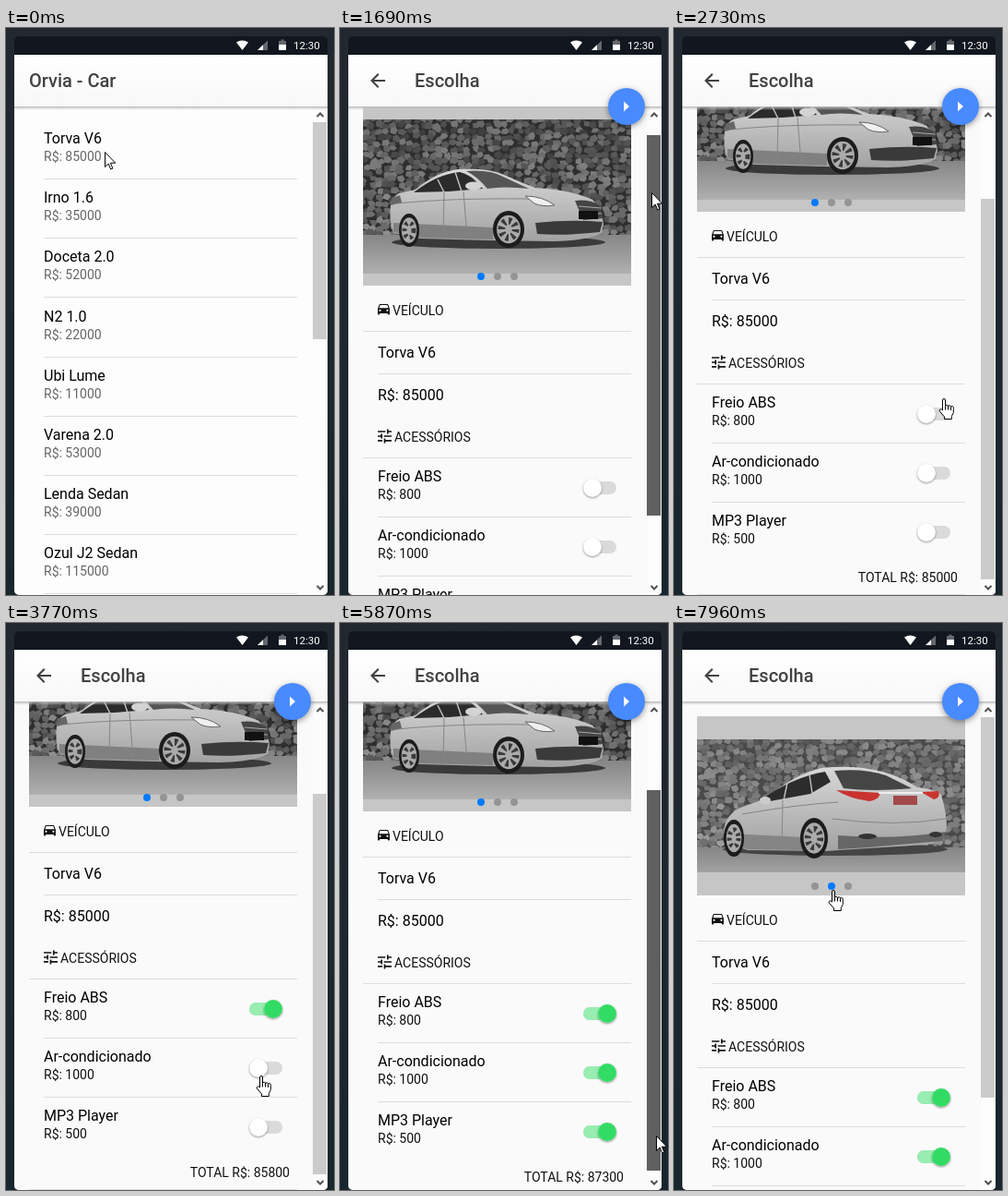
Recreate the animation shown at these times as an HTML page. Size 356x614 px, loop 8000 ms.

```html
<!DOCTYPE html>
<html lang="pt-BR">
<head>
<meta charset="utf-8">
<title>Escolha</title>
<style>
  html, body { margin: 0; width: 100%; height: 100%; overflow: hidden; background: #1d262d; }
  svg { display: block; }
  text { font-family: Roboto, sans-serif; font-size: 14px; fill: #111; white-space: pre; }
  .big { font-size: 16px; fill: #000; }
  .dim { fill: #666; }
  .title { font-size: 20px; font-weight: 500; fill: #424242; }
  .line { fill: #dcdcdc; }
  .knob { filter: drop-shadow(0 1px 1px #0006); }
  .fab { filter: drop-shadow(0 2px 3px #0006); }
</style>
</head>
<body>
<svg id="stage" width="356" height="614" viewBox="0 0 356 614"></svg>
<script>
const STEP = 130, LOOP = 8000, SLIDE = 291;
const cars = [["Torva V6", 85000], ["Irno 1.6", 35000], ["Doceta 2.0", 52000], ["N2 1.0", 22000],
  ["Ubi Lume", 11000], ["Varena 2.0", 53000], ["Lenda Sedan", 39000], ["Ozul J2 Sedan", 115000]];
const extras = [["Freio ABS", 800, 3190], ["Ar-condicionado", 1000, 3970], ["MP3 Player", 500, 4885]];

// Markup helpers
const text = (x, y, s, cls = "") => `<text x="${x}" y="${y}" class="${cls}">${s}</text>`;
const line = (x, y) => `<rect class="line" x="${x}" y="${Math.round(y)}" width="${316 - x}" height="1"/>`;
const path = (d, fill, more = "") => `<path d="${d}" fill="${fill}" ${more}/>`;
const header = (x, s) => `<rect x="9" y="29" width="340" height="56" fill="url(#bar)"/>
  <rect x="9" y="85" width="340" height="4" fill="url(#shade)"/>` + text(x, 64, s, "title");
const scrollbar = (id, height) => `<rect x="333" y="85" width="16" height="529" fill="#fcfcfc"/>
  ${path("M337.5 96l3.5-3.5 3.5 3.5M337.5 604l3.5 3.5 3.5-3.5", "none", 'stroke="#505050" stroke-width="2"')}
  <rect id="${id}" x="333" y="102" width="15" height="${height}" fill="#cbcbcb"/>`;

let seed = 41;
const random = () => (seed = seed * 16807 % 2147483647) / 2147483647;

// Rough stones on a jittered grid, darker towards the top
function wall() {
  let out = "";
  for (let y = 113; y < 250; y += 6.5)
    for (let x = 24; x < 320; x += 8) {
      const cx = x + random() * 5, cy = y + random() * 4, tone = 58 + (y - 113) * .2 + random() * 60 | 0;
      const points = [0, 1, 2, 3, 4].map(i => {
        const r = 2.8 + random() * 2.4;
        return (cx + r * 1.2 * Math.cos(i * 1.26)).toFixed(1) + "," + (cy + r * Math.sin(i * 1.26)).toFixed(1);
      });
      out += `<polygon points="${points.join(" ")}" fill="rgb(${tone},${tone},${tone})"/>`;
    }
  return out;
}

const ellipse = (x, y, rx, ry, fill, more = "") =>
  `<ellipse cx="${x}" cy="${y}" rx="${rx}" ry="${ry}" fill="${fill}" ${more}/>`;
const wheel = (x, y, rx, ry) => ellipse(x, y, rx, ry, "#1c1c1c") + ellipse(x, y, rx * .76, ry * .76, "#aaa") +
  ellipse(x, y, rx * .45, ry * .45, "none", `stroke="#3a3a3a" stroke-width="${rx * .45}" stroke-dasharray="3 3.5"`);

const photo = (x, y, h, light, ground, shapes) => `<svg x="${x}" y="${y}" width="${SLIDE}" height="${h}" viewBox="25 ${y} ${SLIDE} ${h}">
  <rect x="25" y="100" width="291" height="190" fill="#2e2e2e"/><use href="#wall"/>
  <rect x="25" y="100" width="291" height="190" fill="#fff" opacity="${light}"/>
  <rect x="25" y="${ground}" width="291" height="42" fill="url(#ground)"/>${shapes}</svg>`;

const frontView = ellipse(172, 248, 116, 7, "#3a3a3a") +
  path("M55 208Q56 199 64 195L82 191Q104 172 128 169Q158 167 178 175Q198 184 212 189Q254 192 274 202Q284 211 286 228L284 238Q270 246 232 247L160 246 88 244 58 238Q53 225 55 208Z", "url(#body)") +
  path("M58 227L166 232 166 245 88 243 58 237Z", "#808080") +
  path("M80 194Q106 174 130 172Q142 174 155 190L118 193Z", "#2b2b2b") +
  path("M137 171Q162 169 177 177L205 190Q178 187 160 190Q148 176 137 171Z", "#555") +
  path("M106 180L113 194M125 172L132 193", "none", 'stroke="#bdbdbd" stroke-width="1.5"') +
  path("M62 206Q120 200 205 201M113 194L112 240M134 193L138 242", "none", 'stroke="#858585"') +
  path("M56 200l9-3 2 8-12 3z", "#666") + ellipse(145, 187, 9, 4.5, "#d4d4d4") +
  path("M201 198Q220 198 233 208Q220 210 211 206Z", "#f0f0f0", 'stroke="#666"') +
  path("M255 203Q270 201 282 208L286 222 264 224Z", "#444") +
  path("M259 209L283 211M261 216L284 217", "none", 'stroke="#aaa"') +
  path("M212 227Q250 223 285 226L282 237Q246 241 214 239Z", "#3a3a3a") +
  '<rect x="259" y="214" width="21" height="9" fill="#111"/>' +
  wheel(75, 235, 11, 18) + wheel(183, 234, 17, 20);

const rearView = ellipse(175, 245, 122, 7, "#444") +
  path("M54 224Q56 208 72 200L100 190Q130 164 160 157Q196 153 226 161Q250 168 264 178Q284 180 290 186Q296 205 296 222Q293 237 275 240L210 244 165 247 80 246 56 238Z", "url(#body)") +
  path("M58 228L140 232 140 246 80 245 58 238Z", "#858585") +
  path("M94 192Q128 167 164 161L170 172 148 185 104 193Z", "#2c2c2c") +
  path("M174 160Q206 157 230 165L258 179Q216 183 184 179Z", "#454545") +
  path("M123 173L119 192M147 164L150 184", "none", 'stroke="#bdbdbd" stroke-width="1.5"') +
  path("M74 207Q130 197 178 194M118 192L117 242M172 212Q240 221 295 212", "none", 'stroke="#858585"') +
  ellipse(99, 192, 6, 4, "#ccc") +
  path("M176 181L224 184Q222 192 212 193 190 190 176 181Z", "#c9342f") +
  path("M268 183L287 182Q290 189 282 191Z", "#c9342f") +
  '<rect x="222" y="183" width="48" height="2" fill="#eee"/><rect x="238" y="187" width="26" height="10" fill="#a24a4a"/>' +
  path("M178 230Q240 235 295 226L291 236 210 243 178 245Z", "#666") +
  ellipse(210, 231, 10, 3, "#333") + ellipse(284, 229, 7, 3, "#333") +
  wheel(65, 233, 11, 20) + wheel(152, 233, 15, 22);

const rowY = i => 64.17 * i;
const listRows = cars.map(([name, price], i) => text(41, Math.round(125 + rowY(i)), name, "big") +
  text(41, Math.round(144 + rowY(i)), "R$: " + price, "dim") + line(41, 163 + rowY(i))).join("");

const extraRows = extras.map(([name, price], i) => `<g transform="translate(0 ${Math.round(rowY(i))})">
  ${text(41, 507, name, "big")}${text(41, 526, "R$: " + price)}${i < 2 ? line(41, 545) : ""}
  <rect x="264" y="507" width="36" height="14" rx="7" fill="#dadada"/>
  <rect id="track${i}" x="264" y="507" width="36" height="14" rx="7" fill="#98edb1"/>
  <g id="knob${i}" class="knob"><circle cx="274" cy="514" r="10" fill="#fff"/>
  <circle id="tint${i}" cx="274" cy="514" r="10" fill="#32db64"/></g></g>`).join("");

const gradient = (id, from, to) => `<linearGradient id="${id}" x2="0" y2="1"><stop stop-color="${from}"/><stop offset="1" stop-color="${to}"/></linearGradient>`;

stage.innerHTML = `<defs>
  ${gradient("desk", "#22282f", "#19262e")}${gradient("bar", "#fff", "#f8f8f8")}
  ${gradient("shade", "#b4b4b4", "#d0d0d000")}${gradient("ground", "#868686", "#b0b0b0")}${gradient("body", "#d8d8d8", "#a2a2a2")}
  <clipPath id="screen"><rect x="9" y="9" width="340" height="605" rx="5"/></clipPath>
  <g id="wall">${wall()}</g></defs>
  <rect width="356" height="614" fill="url(#desk)"/>
  <g clip-path="url(#screen)">
    <rect x="9" y="29" width="340" height="585" fill="#fdfdfd"/>
    <rect id="pressed" x="25" y="100" width="291" height="63" fill="#efefef"/>
    ${listRows}${scrollbar("listThumb", 235)}${header(25, "Orvia - Car")}
    <g id="detail">
      <rect x="9" y="29" width="340" height="600" fill="#fafafa"/>
      <g id="content">
        <svg x="25" y="101" width="291" height="194" viewBox="25 101 291 194">
          <rect x="25" y="101" width="291" height="194" fill="#c6c6c6"/>
          <g id="slides">${photo(25, 115, 167, 0, 240, frontView)}${photo(25 + SLIDE, 126, 144, .13, 243, `<g transform="translate(${0})">${rearView}</g>`)}</g>
          ${[0, 1].map(i => `<circle id="dot${i}" cx="${153 + 18 * i}" cy="285" r="4"/>`).join("")}
          <circle cx="189" cy="285" r="4" fill="#949494"/>
        </svg>
        ${path("M18.9 6C18.7 5.4 18.2 5 17.5 5h-11C5.8 5 5.3 5.4 5.1 6L3 12v8q0 1 1 1h1q1 0 1-1v-1h12v1q0 1 1 1h1q1 0 1-1v-8zM6.5 16a1.5 1.5 0 1 1 0-3 1.5 1.5 0 0 1 0 3zM17.5 16a1.5 1.5 0 1 1 0-3 1.5 1.5 0 0 1 0 3zM5 11l1.5-4.5h11L19 11z", "#111", 'fill-rule="evenodd" transform="translate(38.8 311.4) scale(.72)"')}
        ${text(57, 327, "VEÍCULO")}${line(25, 344)}
        ${text(41, 373, cars[0][0], "big")}${line(41, 390)}${text(41, 419, "R$: 85000", "big")}
        ${path("M3 17v2h6v-2zM3 5v2h10V5zM13 21v-2h8v-2h-8v-2h-2v6zM7 9v2H3v2h4v2h2V9zM21 13v-2H11v2zM15 9h2V7h4V5h-4V3h-2z", "#111", 'transform="translate(38.5 448) scale(.83)"')}
        ${text(59, 464, "ACESSÓRIOS")}${line(25, 481)}
        ${extraRows}
        <text id="total" x="308" y="696" text-anchor="end"></text>${line(25, 709)}
      </g>
      ${scrollbar("thumb", 412)}${header(81, "Escolha")}
      ${path("M49 56H37l5.5-5.6L41 49l-8 8 8 8 1.4-1.4L37 58H49z", "#424242")}
      <circle class="fab" cx="311" cy="85" r="20" fill="#488aff"/>${path("M308 79.5v11l6-5.5z", "#fff")}
    </g>
    <rect x="9" y="9" width="340" height="20" fill="#12171f"/>
    <g fill="#fff">
      <path d="M250 15.5Q256.5 11.5 263 15.5L256.5 24z"/>
      <path d="M284 13.5V24H273z" opacity=".35"/><path d="M279 18.3V24H273z"/>
      <path d="M296 14h2.5v-1.5h3V14h2.5v10h-8z" opacity=".35"/><path d="M296 18h8v6h-8z"/>
    </g>
    <text x="312" y="23" style="font-size:11.5px;fill:#fff">12:30</text>
  </g>
  <g id="arrow" fill="#fff" stroke="#000"><path d="M.5.5V16.5l3.7-3.5 2.5 6 2.2-1-2.5-5.8h5.3z"/></g>
  <g id="hand" fill="#fff" stroke="#000"><g transform="translate(-6)">
    <path d="M4.5 13V2a1.5 1.5 0 0 1 3 0V8.5a1.5 1.5 0 0 1 3 .5 1.5 1.5 0 0 1 3 .7 1.4 1.4 0 0 1 2.8.8V15.5l-2 4V22.5H6.5V20L1.3 14a1.5 1.5 0 0 1 2-2z"/>
    <path d="M7.5 8.5v4M10.5 9v3.5M13.5 10v3"/></g></g>`;

// Pointer and scroll positions: time, values
const pointerKeys = [[0, 107, 134], [780, 107, 134], [1430, 338, 164], [1560, 338, 164], [1690, 338, 178],
  [2080, 338, 248], [2340, 338, 248], [2730, 293, 401], [2860, 278, 423], [2990, 277, 425], [3380, 277, 425],
  [3770, 277, 490], [4160, 277, 490], [4550, 281, 556], [5080, 281, 556], [5470, 343, 560], [5720, 343, 559],
  [5850, 343, 555], [6240, 343, 476], [6500, 338, 440], [6630, 314, 393], [6760, 227, 339], [7280, 173, 289]];
const scrollKeys = [[0, 0], [1560, 0], [1690, 16], [2080, 96], [5720, 96], [5850, 91], [6240, 0]];

function sample(keys, t) {
  const next = keys.findIndex(k => k[0] > t);
  if (next < 0) return keys.at(-1).slice(1);
  const a = keys[next - 1], b = keys[next], u = (t - a[0]) / (b[0] - a[0]);
  return a.slice(1).map((v, i) => v + (b[i + 1] - v) * u);
}
const progress = (t, start, length) => Math.min(1, Math.max(0, (t - start) / length));
const easeOut = u => u * (2 - u);
const within = (t, from, to) => t >= from && t < to;
const el = id => document.getElementById(id);
const set = (id, name, value) => el(id).setAttribute(name, value);
const move = (id, x, y) => set(id, "transform", `translate(${x} ${y})`);

function render(time) {
  const t = Math.floor((time % LOOP + 2) / STEP) * STEP;  // each picture is held for one step
  const enter = easeOut(progress(t, 450, 280));
  set("pressed", "opacity", within(t, 260, 780) ? 1 : 0);
  set("detail", "opacity", enter);
  move("detail", 0, 40 * (1 - enter));

  const [x, y] = sample(pointerKeys, t).map(Math.round);
  const [scroll] = sample(scrollKeys, t).map(Math.round);
  const dragging = within(t, 1560, 2300) || within(t, 5720, 6600);
  move("content", 0, -scroll);
  set("thumb", "y", Math.round(101.6 + scroll * .87));
  set("thumb", "fill", dragging ? "#606060" : x > 332 ? "#a6a6a6" : "#cbcbcb");

  let sum = cars[0][1];
  extras.forEach(([, price, start], i) => {
    const u = progress(t, start, 300);
    if (u > 0) sum += price;
    move("knob" + i, 16 * easeOut(u), 0);
    set("track" + i, "opacity", u);
    set("tint" + i, "opacity", u);
  });
  el("total").textContent = "TOTAL R$: " + sum;

  const slide = easeOut(progress(t, 7610, 300));
  move("slides", -SLIDE * slide, 0);
  set("dot0", "fill", slide > 0 ? "#949494" : "#007aff");
  set("dot1", "fill", slide > 0 ? "#007aff" : "#949494");

  const hand = within(t, 2600, 5100) || t >= 7150;
  set("hand", "visibility", hand ? "visible" : "hidden");
  set("arrow", "visibility", hand ? "hidden" : "visible");
  move(hand ? "hand" : "arrow", x, y);
}

const begin = performance.now();
(function tick() {
  render(performance.now() - begin);
  requestAnimationFrame(tick);
})();
</script>
</body>
</html>
```
